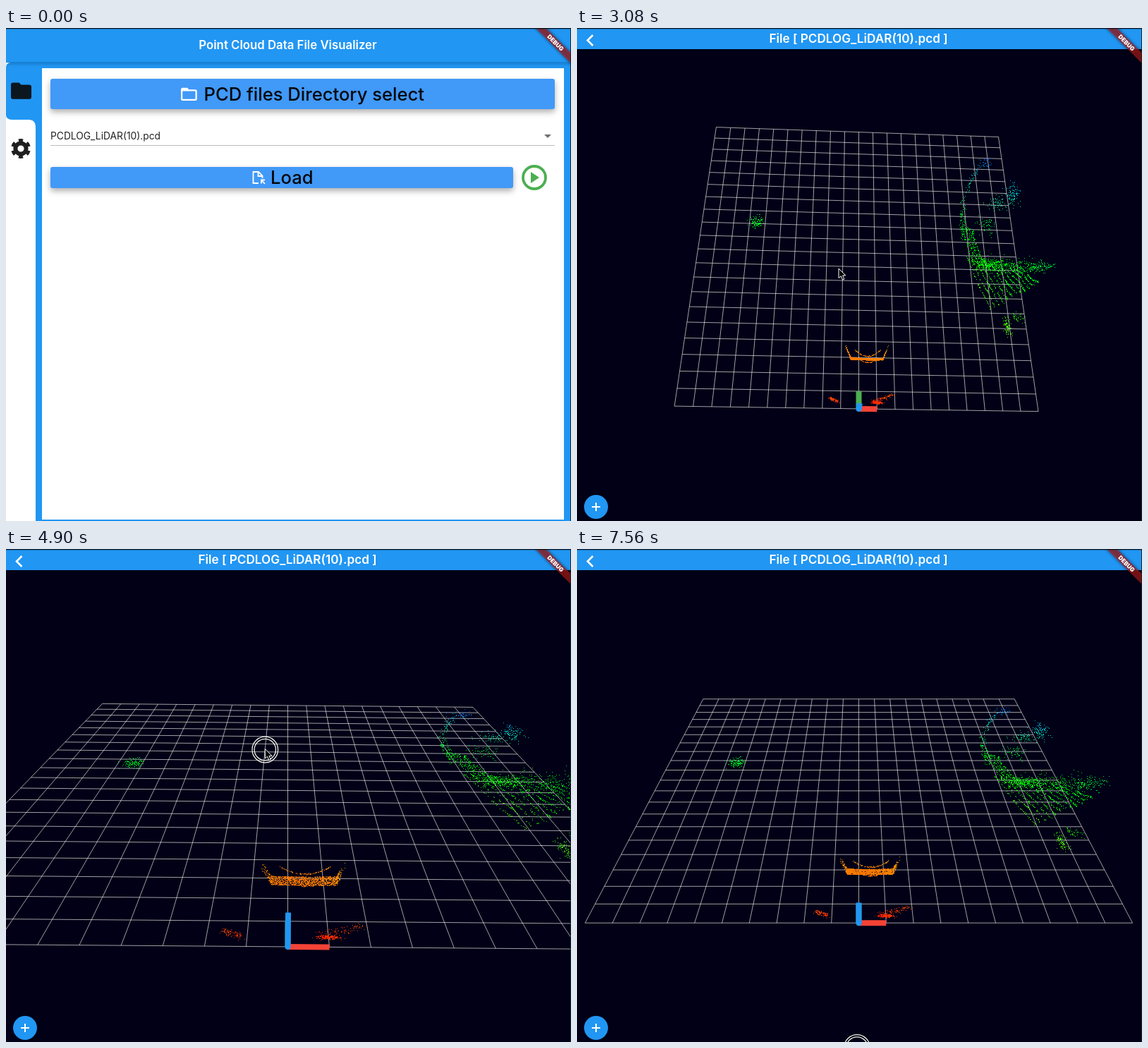
Write an HTML page with a canvas that moves like this. It is 801 px wide and 699 px high and loops after 7630 ms.

```html
<!DOCTYPE html>
<html lang="en">
<head>
<meta charset="utf-8">
<title>Point cloud viewer</title>
<style>
  html, body { margin: 0; width: 100%; height: 100%; overflow: hidden; background: #000; }
  #stage { position: relative; width: 801px; height: 699px; overflow: hidden; background: #fff; }
  .layer { position: absolute; left: 0; top: 0; width: 801px; height: 699px; display: block; overflow: hidden; }
  text { font-family: Inter, Roboto, sans-serif; }
  .bar { font-weight: 600; fill: #fff; text-anchor: middle; }
  .btn { font-size: 25.6px; font-weight: 500; fill: #05070a; }
  .raised { filter: drop-shadow(0 4px 4px rgba(0, 0, 0, .32)); }
  .blur { filter: blur(2px); }
</style>
</head>
<body>
<div id="stage">
  <svg id="home" class="layer" viewBox="0 0 801 699">
    <rect width="801" height="699" fill="#2196f3"/>
    <rect y="47" width="801" height="4" fill="#0b5c9e" opacity=".55" class="blur"/>
    <rect width="801" height="48" fill="#2196f3"/>
    <path d="M0 124Q1 130 9 130H32Q42 130 42 141V699H0Z" fill="#fff"/>
    <path d="M0 49H6Q0 50 0 56Z" fill="#fff"/>
    <rect x="51" y="57" width="740" height="640" fill="#fff"/>
    <text class="bar" x="399.5" y="30" font-size="16.8">Point Cloud Data File Visualizer</text>

    <path transform="translate(4.1 71.8) scale(1.45)" fill="#0b1620"
      d="M10 4H4c-1.1 0-2 .9-2 2v12c0 1.1.9 2 2 2h16c1.1 0 2-.9 2-2V8c0-1.1-.9-2-2-2h-8l-2-2z"/>
    <g transform="translate(21 171)" fill="none" stroke="#1f1f1f">
      <circle r="7.6" stroke-width="6"/>
      <circle r="11.5" stroke-width="5" pathLength="12" stroke-dasharray="1 1" stroke-dashoffset="-.5"/>
    </g>

    <rect class="raised" x="63" y="72" width="715" height="43" rx="3" fill="#4199f8"/>
    <path transform="translate(245.7 80.3) scale(1.14)" fill="#fff"
      d="M20 6h-8l-2-2H4c-1.1 0-2 .9-2 2v12c0 1.1.9 2 2 2h16c1.1 0 2-.9 2-2V8c0-1.1-.9-2-2-2zm0 12H4V8h16v10z"/>
    <text class="btn" x="280.5" y="103">PCD files Directory select</text>

    <text x="63" y="158" font-size="13.8" fill="#222">PCDLOG_LiDAR(10).pcd</text>
    <path d="M763 151h10l-5 5z" fill="#707070"/>
    <path d="M63 166.500H778" stroke="#bdbdbd"/>

    <rect class="raised" x="63" y="197" width="656" height="30" rx="3" fill="#4199f8"/>
    <rect id="glow" x="63" y="197" width="656" height="30" rx="3" fill="#fff"/>
    <path d="M358 220H350.500V204H358L363.500 209.500V213M357.500 204V210H363.500M367 215.500H362V220.500M362 215.500L367 221"
      fill="none" stroke="#fff" stroke-width="1.8"/>
    <text class="btn" x="375" y="221">Load</text>
    <circle cx="749" cy="212" r="16" fill="none" stroke="#4caf50" stroke-width="3.8"/>
    <path d="M744 204L756 212L744 220Z" fill="#4caf50"/>
  </svg>

  <div id="view" class="layer">
    <canvas id="scene" class="layer" width="801" height="699"></canvas>
    <svg class="layer" viewBox="0 0 801 699">
      <rect width="801" height="30" fill="#2196f3"/>
      <path d="M22.500 10L15 17.500L22.500 25" fill="none" stroke="#fff" stroke-width="2.6"/>
      <text class="bar" x="399" y="21" font-size="17.2">File [ PCDLOG_LiDAR(10).pcd ]</text>
      <circle cx="27" cy="679" r="17" fill="#2196f3"/>
      <path d="M21 679H33M27 673V685" stroke="#fff" stroke-width="2"/>
    </svg>
  </div>

  <svg class="layer" viewBox="0 0 801 699">
    <g transform="translate(800 0) rotate(45)">
      <rect class="blur" x="-40" y="24" width="80" height="11" opacity=".5"/>
      <rect x="-40" y="24.4" width="80" height="10.400" fill="#b71c1c" fill-opacity=".63"/>
      <text y="32.6" font-size="8.3" font-weight="900" fill="#fff" text-anchor="middle">DEBUG</text>
    </g>
    <rect width="801" height="1.300" fill="#0c1420"/>
    <rect x="800" width="1" height="699" fill="#1c2430"/>
    <g id="mouse">
      <g id="ring" fill="none" stroke="#f2f2e8" stroke-width="1.3">
        <circle cy="1" r="18.300"/><circle cy="1" r="15.200"/>
      </g>
      <path d="M0 0V13.500L3.200 10.700L5.500 16L7.900 15L5.600 9.900H9.800Z" fill="#000" stroke="#fff"/>
    </g>
  </svg>
</div>

<script>
const $ = id => document.getElementById(id);
const LOOP = 7630, STEP = 70, W = 801, H = 699;
const CX = 399.5, CY = 360, FOCAL = 852, PIVOT = 7.93;
const DRAG_FROM = 2030, DRAG_TO = 6090, GAIN = .62;
const ctx = $('scene').getContext('2d');

const clamp = (v, lo, hi) => Math.min(hi, Math.max(lo, v));
const smooth = u => u * u * (3 - 2 * u);
const easeOut = u => 1 - (1 - u) ** 3;

// Each move: start, end, then the values reached; values rest between moves.
function follow(moves, first, ease, t) {
  return moves.reduce((pos, [a, b, ...goal]) => {
    const u = ease(clamp((t - a) / (b - a), 0, 1));
    return pos.map((v, i) => v + (goal[i] - v) * u);
  }, first);
}

const restPoint = [397, 706], grab = [366.4, 387];
const mouseMoves = [
  [0, 210, 317, 165], [350, 560, 344, 226], [840, 1260, 359, 215],
  [1540, 2000, ...grab],
  [DRAG_FROM, 2380, 368, 346], [2450, 2590, 371, 341],
  [3990, 4830, 367.3, 283.5], [4900, 5600, 385, 290], [5670, DRAG_TO, ...[grab[0], 296]],
  [6370, 7070, ...restPoint]
];
const zoomMoves = [[2800, 3290, 23.7], [3570, 3920, 39.5], [6370, 6790, 29.83]];
const presses = [[560, 980], [DRAG_FROM, 2590], [3990, DRAG_TO], [7560, LOOP]];

const mouseAt = t => follow(mouseMoves, restPoint, smooth, t);

// Dragging turns the model by a fixed angle per pixel.
function cameraAt(t) {
  const [x, y] = mouseAt(clamp(t, DRAG_FROM, DRAG_TO));
  const rad = GAIN * Math.PI / 180;
  const [zoom] = follow(zoomMoves, [16.9], easeOut, t);
  return { tilt: (grab[1] - y) * rad, turn: (x - grab[0]) * rad, zoom };
}

// Page slide: cubic curve (.35,.91) (.33,.97)
function slide(t) {
  const x = clamp((t - 1094) / 500, 0, 1);
  const curve = (s, a, b) => 3 * (1 - s) ** 2 * s * a + 3 * (1 - s) * s * s * b + s ** 3;
  if (x === 0 || x === 1) return x;
  let lo = 0, hi = 1;
  for (let i = 0; i < 24; i++) {
    const m = (lo + hi) / 2;
    if (curve(m, .35, .33) < x) lo = m; else hi = m;
  }
  return curve(lo, .91, .97);
}

let seed = 41;
const rnd = () => (seed = (seed * 16807) % 2147483647) / 2147483647;
const gauss = () => rnd() + rnd() + rnd() + rnd() - 2;
const ground = y => clamp((y - 7) * .18, -.4, .45);
const points = [];

// Colour runs from red to blue with distance from the sensor.
function add(x, y, z = ground(y)) {
  const d = Math.hypot(x, y);
  const hue = Math.min(9.8 * d, 118) + 1.5 * Math.max(0, d - 11.5) ** 2;
  points.push({ x, y, z, color: `hsl(${hue},100%,50%)` });
}

function blob(n, x, y, sx, sy, sz = .15, z = ground(y)) {
  while (n--) add(x + gauss() * sx, y + gauss() * sy, z + gauss() * sz);
}

// Points scattered along a curve given by path(s), s from 0 to 1.
function strand(n, spread, path) {
  while (n--) {
    const [x, y, z = ground(y)] = path(rnd());
    add(x + gauss() * spread, y + gauss() * spread, z + gauss() * spread);
  }
}

function buildCloud() {
  // near bowl: stacked scan lines with raised, thinner ends
  for (let j = 0; j < 7; j++) {
    strand(240, .012, s => {
      const u = (2 * s - 1) * (.77 + .23 * rnd() ** 3);
      const rise = Math.max(0, Math.abs(u) - .73) / .27;
      return [.45 + 1.27 * u, 2.94 + .05 * u * u + .85 * rise, -.18 + .045 * j];
    });
  }
  strand(90, .02, s => [-.26 + 1.48 * s, 3.05 + 1.6 * (s - .5) ** 2, .12]);
  strand(50, .02, s => [.05 + .95 * s, 2.76 + .7 * (s - .5) ** 2, -.1]);

  // red patches beside the sensor
  strand(95, .075, s => [-1.62 + .46 * s, .6 - .18 * s, 0]);
  blob(210, 1, .38, .25, .07, .02, 0);
  strand(100, .09, s => [.75 + 1.15 * s, .4 + .45 * s, 0]);

  // left patch
  blob(115, -6.6, 12.3, .4, .45, .15, -.3);

  // right structure: core, scan-line fan, curved edge, arm and outlying clumps
  blob(330, 8, 9.2, .8, .4);
  for (let k = 0; k < 12; k++) {
    strand(62, .035, s => [
      6.7 + .28 * k + 1.3 * s,
      9.7 - .04 * k - (3.4 - .2 * k) * s ** .9 + .08 * Math.sin(9 * s + k)
    ]);
  }
  for (let k = 0; k < 4; k++) {
    strand(60, .06, s => [6.6 + .22 * k + .5 * (1 - s) ** 2, 9.3 + (3.6 - .4 * k) * s]);
  }
  strand(120, .13, s => [6.6 + 2.2 * s ** 3, 11 + 6.6 * s ** 1.2]);
  strand(240, .4, s => [8.6 + 3 * s, 9.1]);
  strand(60, .25, s => [10.7 + 1.5 * s, 9 + .3 * s]);
  blob(95, 10.2, 14.7, .4, .9);
  blob(60, 9.1, 13.9, .6, .6);
  blob(60, 8.2, 12.1, .5, .8);
  blob(30, 8.6, 17.2, .5, .4);
  blob(95, 8.95, 5.3, .17, .55);
  blob(40, 9.6, 5.9, .4, .35);
}

function projector({ tilt, turn, zoom }) {
  const ct = Math.cos(tilt), st = Math.sin(tilt), cp = Math.cos(turn), sp = Math.sin(turn);
  return (x, y, z) => {
    const px = x * cp + z * sp, pz = z * cp - x * sp, py = y - PIVOT;
    const m = FOCAL / (FOCAL / zoom - pz * ct + py * st);
    return [CX + px * m, CY - (py * ct + pz * st) * m];
  };
}

function line(a, b) {
  ctx.moveTo(...a);
  ctx.lineTo(...b);
}

function drawScene(cam) {
  const proj = projector(cam), origin = proj(0, 0, 0);
  ctx.fillStyle = '#010016';
  ctx.fillRect(0, 0, W, H);

  ctx.strokeStyle = 'rgba(255,255,250,.62)';
  ctx.lineWidth = 1;
  ctx.beginPath();
  for (let i = 0; i <= 20; i++) {
    line(proj(i - 10, 0, 0), proj(i - 10, 20, 0));
    line(proj(-10, i, 0), proj(10, i, 0));
  }
  ctx.stroke();

  ctx.globalAlpha = .85;
  for (const p of points) {
    const [x, y] = proj(p.x, p.y, p.z);
    ctx.fillStyle = p.color;
    ctx.fillRect(Math.round(x), Math.round(y), 1, 1);
  }
  ctx.globalAlpha = 1;

  const axis = (end, color) => {
    ctx.strokeStyle = color;
    ctx.lineWidth = 8;
    ctx.beginPath();
    line(origin, proj(...end));
    ctx.stroke();
  };
  axis([0, 1, 0], '#4caf50');
  axis([1, 0, 0], '#f44336');
  axis([0, 0, 1], '#2196f3');
  ctx.fillStyle = '#2196f3';
  ctx.beginPath();
  ctx.arc(...origin, 4, 0, 2 * Math.PI);
  ctx.fill();
}

function render(t) {
  const p = slide(t);
  $('home').style.transform = `translateX(${-p * W / 3}px)`;
  $('view').style.transform = `translateX(${(1 - p) * W}px)`;
  $('glow').setAttribute('opacity', t >= 560 ? .1 : 0);
  $('mouse').setAttribute('transform', `translate(${mouseAt(t)})`);
  const down = presses.some(([a, b]) => t >= a && t < b);
  $('ring').setAttribute('visibility', down ? 'visible' : 'hidden');
  if (p > 0) drawScene(cameraAt(t));
}

let last = -1;
const start = performance.now();
function tick() {
  const now = (performance.now() - start) % LOOP;
  const t = Math.floor(now / STEP) * STEP;
  if (t !== last) render(last = t);
  requestAnimationFrame(tick);
}

buildCloud();
tick();
</script>
</body>
</html>
```
